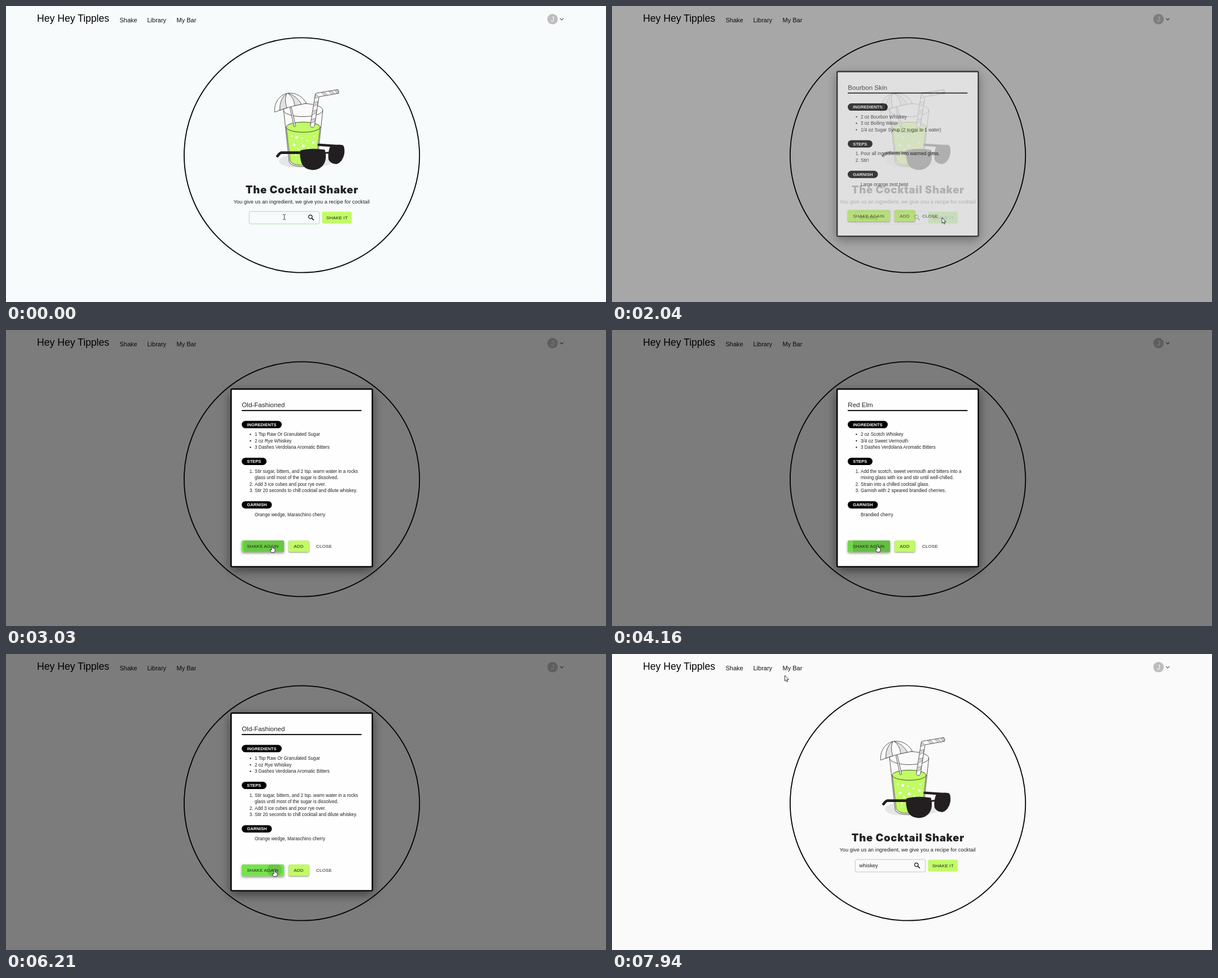
These frames come from a looping animation (1064x526 px, 8 s). An HTML page:

```html
<!DOCTYPE html>
<html lang="en">
<head>
<meta charset="utf-8">
<title>Cocktail shaker</title>
<style>
  html, body { margin: 0; width: 100%; height: 100%; overflow: hidden; background: #fafafa; }
  svg { display: block; }
  text { font-family: "Liberation Sans", Arial, sans-serif; fill: #222; white-space: pre; }
  .brand { font-size: 17.6px; fill: #000; }
  .nav { font-size: 11px; fill: #111; }
  .big { font: 900 18.5px Inter, "Open Sans", sans-serif; letter-spacing: .75px; }
  .sub { font-size: 9.32px; }
  .btn { font-size: 8px; letter-spacing: .2px; }
  .title { font-size: 11.6px; }
  .row { font-size: 8.16px; }
  .badge { font-size: 7.65px; font-weight: bold; fill: #fff; }
  .paper { fill: #fafafa; stroke: #231f20; stroke-width: .75; stroke-linejoin: round; }
  .dark { fill: #231f20; }
  .rim { fill: none; stroke: #231f20; stroke-linecap: round; stroke-linejoin: round; }
  .card { fill: #fefefe; stroke: #000; stroke-width: 2.4; filter: drop-shadow(0 6px 9px rgba(0,0,0,.5)); }
</style>
</head>
<body>
<svg id="stage" width="1064" height="526" viewBox="0 0 1064 526">
  <rect id="back" width="1064" height="526"/>
  <text class="brand" x="55" y="28.3">Hey Hey Tipples</text>
  <text class="nav" x="201.5" y="28.5">Shake</text>
  <text class="nav" x="250.5" y="28.5">Library</text>
  <text class="nav" x="302.5" y="28.5">My Bar</text>
  <circle cx="969.2" cy="23.3" r="9.3" fill="#bdbdbd"/>
  <text x="969.2" y="27.8" text-anchor="middle" font-size="13" style="fill:#fafafa">J</text>
  <path d="M982.5 21.8l3 3 3-3" fill="none" stroke="#555" stroke-width="1.2"/>
  <circle cx="524.6" cy="265" r="208.7" fill="none" stroke="#000" stroke-width="1.8"/>

  <!-- drink -->
  <g>
    <ellipse cx="517" cy="275.5" rx="33" ry="11.5" fill="#e6e6e7"/>
    <ellipse cx="556" cy="277" rx="21" ry="8" fill="#e6e6e7"/>
    <path class="paper" d="M492.3 185L502 276q1 9 25 9.5 24-.5 25-9.5L561.8 185z"/>
    <path d="M497 215L504 275q3 8 23 8t23-8L557 215z" fill="#c1fb65" stroke="#231f20" stroke-width=".7"/>
    <ellipse cx="527" cy="215.3" rx="30" ry="9" fill="#c1fb65" stroke="#231f20" stroke-width=".8"/>
    <g id="bubbles" fill="#fff"></g>
    <ellipse class="paper" cx="527" cy="185" rx="34.8" ry="11.6"/>
    <path class="paper" d="M503.5 181l7.4 33.2q1.6 1 2.8-.6L506 180z"/>
    <path class="paper" d="M476.5 188.6C475 172 485 157 500.5 155 515 153.5 527 162 532.6 173Q504 177.5 476.5 188.6z"/>
    <path d="M498 155.4Q485 164 485.5 185.3L498 181Q493 166 498 155.4zM500 155Q511 163 512 177.2L524 174.7Q516 160 500 155z" fill="#e2e2e3" stroke="#231f20" stroke-width=".7"/>
    <path class="paper" d="M539.6 213.5L548.5 156.5Q548.8 155.3 550 155L588.5 148.5Q591.5 151 589.5 155.2L555 161.3 547 213.5Q543 218.5 539.6 213.5z"/>
    <path d="M540.3 208.5l7.3-3 1-6-7.3 2zm2.3-15l7.3-3 1-6-7.3 2zm2.3-15l7.3-3 1-6-7.3 2zm2.3-14l7.3-3-5-5z
             M559 153.7l6 5.7 5.5-1-6-5.6zm13-2.2l6 5.7 5.5-1-6-5.6zm11-1.9l3.5 5.7 3-.4-2-6z" fill="#d4d4d5" stroke="#231f20" stroke-width=".4"/>
    <path class="rim" stroke-width="4.3" d="M554.5 246.6L596 249.5"/>
    <path class="rim" stroke-width="4.8" d="M524 260.6H488.5Q486 260.6 481.5 266.6"/>
    <path class="rim" stroke-width="3" d="M565 262.5Q569 259.5 574 261.5"/>
    <path class="dark" d="M524 256Q544 252 565.5 255.5 569.5 270 564 280.5 558 291 543 291.6 528.5 290 524.5 280 520 267 522 257z"/>
    <path class="dark" d="M575 249.5Q588 245 597.5 247.5 601 250 600 262.5 597 277.5 586 281 575.5 280.5 572 273 570 260 575 249.5z"/>
  </g>

  <text class="big" x="524.9" y="333" text-anchor="middle">The Cocktail Shaker</text>
  <text class="sub" x="403.5" y="350.5">You give us an ingredient, we give you a recipe for cocktail</text>
  <g id="live"></g>
</svg>
<script>
const LOOP = 8000;
const LIME = '#c1fb65', GREEN = '#76e34c';
const el = id => document.getElementById(id);

const bubbles = [[507,231,1.4],[515.5,233.5,2.5],[525,235,1.2],[534.5,239,1.2],[546.5,231,1.2],
  [511,247,2.4],[527,248.5,2.6],[545,242.5,2.2],[518,254,1.4],[536,252.5,1.4],[514,265,1.4]];
el('bubbles').innerHTML = bubbles.map(([x, y, r]) => `<circle cx="${x}" cy="${y}" r="${r}"/>`).join('');

const bourbonSkin = {
  name: 'Bourbon Skin',
  parts: ['2 oz Bourbon Whiskey', '3 oz Boiling Water', '1/4 oz Sugar Syrup (2 sugar to 1 water)'],
  steps: ['Pour all ingredients into warmed glass.', 'Stir!'],
  garnish: 'Large orange zest twist'
};
const oldFashioned = {
  name: 'Old-Fashioned',
  parts: ['1 Tsp Raw Or Granulated Sugar', '2 oz Rye Whiskey', '3 Dashes Verdolana Aromatic Bitters'],
  steps: ['Stir sugar, bitters, and 2 tsp. warm water in a rocks|glass until most of the sugar is dissolved.',
    'Add 3 ice cubes and pour rye over.', 'Stir 20 seconds to chill cocktail and dilute whiskey.'],
  garnish: 'Orange wedge, Maraschino cherry'
};
const redElm = {
  name: 'Red Elm',
  parts: ['2 oz Scotch Whiskey', '3/4 oz Sweet Vermouth', '3 Dashes Verdolana Aromatic Bitters'],
  steps: ['Add the scotch, sweet vermouth and bitters into a|mixing glass with ice and stir until well-chilled.',
    'Strain into a chilled cocktail glass.', 'Garnish with 2 speared brandied cherries.'],
  garnish: 'Brandied cherry'
};
const mountain = {
  name: 'Mountain',
  parts: ['2 oz Bourbon Whiskey', '3/4 oz Dry Vermouth', '3/4 oz Sweet Vermouth', '1/2 oz Egg White'],
  steps: ['Shake all with ice.', 'Fine strain into chilled glass.'],
  garnish: 'Tolvano cherry'
};
const shown = [[0, bourbonSkin], [2780, oldFashioned], [3480, redElm], [5200, mountain], [6110, oldFashioned]];

// [time, x of press]
const clicks = [[2750, 470], [3450, 472], [3910, 471], [5150, 478], [6080, 476]];

// [time, x, y, shape from here on]
const path = [
  [0, 493.5, 375, 'beam'], [700, 493.5, 375, 'arrow'], [950, 505, 414, 'arrow'], [1450, 505, 414, 'arrow'],
  [1760, 587, 376, 'arrow'], [1990, 587, 376, 'arrow'], [2100, 583, 376, 'arrow'], [2350, 583, 376, 'arrow'],
  [2650, 470, 373, 'hand'], [2800, 470, 373, 'hand'], [3000, 472, 383, 'hand'], [3900, 471, 382, 'hand'],
  [4780, 471, 382, 'hand'], [5100, 478, 378, 'hand'], [5220, 478, 378, 'hand'], [5390, 496, 388, 'arrow'],
  [5440, 496, 388, 'arrow'], [5620, 505, 425, 'arrow'], [5740, 505, 425, 'arrow'], [6000, 476, 383, 'hand'],
  [6600, 476, 383, 'hand'], [6770, 524, 387, 'beam'], [7300, 524, 387, 'arrow'], [7850, 306.5, 38, 'arrow']
];
const shapes = {
  arrow: '<path d="M0 0V10l2.3-2 1.5 3.5 1.5-.7-1.5-3.3H7z" fill="#fff" stroke="#222" stroke-width=".9"/>',
  beam: '<path d="M-2.5-4.5H-.6L0-4 .6-4.5H2.5M0-4V4M-2.5 4.5H-.6L0 4 .6 4.5H2.5" fill="none" stroke="#444" stroke-width="1"/>',
  hand: '<path d="M-1 0Q0-1 1 0V4.5L5 5.7V9.5L4 12.5H-1.5L-4 8Q-3.5 6.5-1 8z" fill="#fff" stroke="#222" stroke-width=".9"/>'
};

const clamp = v => Math.max(0, Math.min(1, v));
const pulse = (t, on, off, ms = 160) => clamp((t - on) / ms) * (1 - clamp((t - off) / ms));

// cubic-bezier(.4, 0, .2, 1)
function ease(x) {
  x = clamp(x);
  let lo = 0, hi = 1;
  for (let i = 0; i < 20; i++) {
    const s = (lo + hi) / 2, q = 1 - s;
    if (1.2 * q * q * s + .6 * q * s * s + s ** 3 < x) lo = s; else hi = s;
  }
  return 3 * (1 - lo) * lo * lo + lo ** 3;
}

const text = (cls, x, y, s, more = '') => `<text class="${cls}" x="${x}" y="${y}" ${more}>${s}</text>`;
const rect = (x, y, w, h, r, more) => `<rect x="${x}" y="${y}" width="${w}" height="${h}" rx="${r}" ${more}/>`;

function button(x, y, w, h, label, tx, hover, raised, ripple = '') {
  const drop = raised ? `style="filter:drop-shadow(0 ${1 + hover}px ${1 + hover}px rgba(0,0,0,.45))"` : '';
  return rect(x, y, w, h, 2.6, `fill="${LIME}" ${drop}`) +
    rect(x, y, w, h, 2.6, `fill="${GREEN}" opacity="${hover}"`) +
    `<svg x="${x}" y="${y}" width="${w}" height="${h}">${ripple}</svg>` +
    text('btn', tx, y + h / 2 + 2.9, label);
}

function field(t) {
  const focus = t >= 250 && t < 1850;
  const word = 'whiskey'.slice(0, t < 640 ? 0 : Math.floor((t - 640) / 120) + 1);
  const stroke = t < 250 ? '#a2e592' : focus ? GREEN : '#c4c4c4';
  const caret = focus ? '<tspan dx=".3" font-size="9">|</tspan>' : '';
  return rect(431.3, 365.2, 124.5, 22, 2.6, `fill="none" stroke="${stroke}" stroke-width="${focus ? 1.4 : 1}"`) +
    text('sub', 438.5, 379.2, word + caret) +
    '<circle cx="539.8" cy="374.6" r="3.2" fill="none" stroke="#111" stroke-width="1.2"/>' +
    '<path d="M542.2 377L545.8 380.6" stroke="#111" stroke-width="1.6"/>' +
    button(560.6, 365.5, 52.5, 21, 'SHAKE IT', 568, pulse(t, 1680, 2000), false);
}

function badge(y, label, w) {
  return rect(418, y - 6.5, w, 13, 6.5, '') + text('badge', 427.3, y + 2.7, label);
}

function ripples(t) {
  return clicks.filter(([c]) => t >= c && t < c + 800).map(([c, x]) => {
    const age = t - c;
    return `<circle cx="${x - 418}" cy="10" r="${62 * ease(age / 550)}" opacity="${.12 * (1 - clamp((age - 550) / 250))}"/>`;
  }).join('');
}

function dialog(t) {
  const r = shown.filter(([start]) => t >= start).pop()[1];
  const lines = r.steps.flatMap((s, i) => s.split('|').map((l, j) => [l, j ? '' : `${i + 1}.`]));
  const h = 295 + 11.5 * (r.parts.length + lines.length - 5);
  const top = 262.8 - h / 2;
  let y = top + 64.3;
  let out = rect(399.2, top + 1.2, 250.4, h - 2.4, 1.8, 'class="card"') +
    text('title', 418.3, top + 33.6, r.name) +
    rect(418, top + 38.4, 212.5, 1.9, 0, '') +
    badge(y, 'INGREDIENTS', 71);
  y += 17.3;
  for (const p of r.parts) {
    out += `<circle cx="433.5" cy="${y}" r="1.2" fill="#222"/>` + text('row', 441, y + 2.7, p);
    y += 11.5;
  }
  out += badge(y += 13.5, 'STEPS', 44);
  y += 17.8;
  for (const [line, mark] of lines) {
    out += text('row', 438.6, y + 2.7, mark, 'text-anchor="end"') + text('row', 441, y + 2.7, line);
    y += 11.5;
  }
  out += badge(y += 13.5, 'GARNISH', 53.5) + text('row', 441, y + 20.6, r.garnish);
  y += 63.2;
  const again = Math.max(pulse(t, 2600, 5420), pulse(t, 5950, 6620));
  return out +
    button(418, y, 75, 20.6, 'SHAKE AGAIN', 427.3, again, true, ripples(t)) +
    button(501, y, 36.4, 20.6, 'ADD', 510.2, pulse(t, 6680, 7500), true) +
    text('btn', 550, y + 13.2, 'CLOSE');
}

function cursor(t) {
  const i = path.findLastIndex(k => t >= k[0]);
  const [t0, x0, y0, shape] = path[i];
  const [t1, x1, y1] = path[i + 1] || [LOOP, x0, y0];
  const p = (t - t0) / (t1 - t0), e = p * p * (3 - 2 * p);
  return `<g transform="translate(${x0 + (x1 - x0) * e} ${y0 + (y1 - y0) * e})">${shapes[shape]}</g>`;
}

function draw(now) {
  const t = now % LOOP;
  const fade = t < 7280 ? ease((t - 1945) / 225) : 1 - ease((t - 7280) / 195);
  el('back').setAttribute('fill', t < 1940 ? '#f7fbfc' : '#fafafa');
  el('live').innerHTML = field(t) +
    (fade > 0 ? `<rect width="1064" height="526" opacity="${fade / 2}"/><g opacity="${fade}">${dialog(t)}</g>` : '') +
    cursor(t);
}

const start = performance.now();
function tick() {
  draw(performance.now() - start);
  requestAnimationFrame(tick);
}
tick();
</script>
</body>
</html>
```
